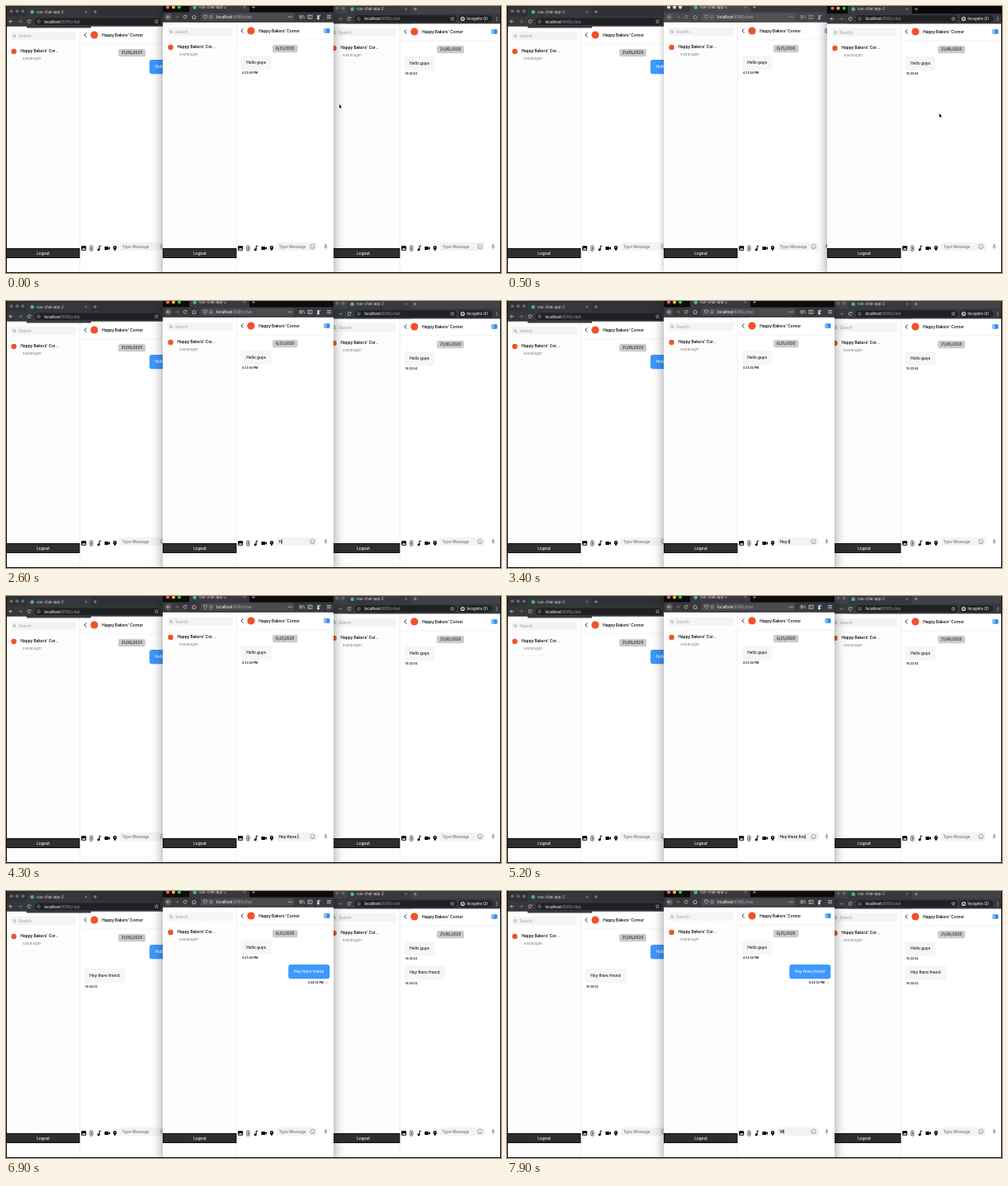
Recreate the animation shown at these times as an HTML page with a canvas. Size 600 by 323 pixels, loop 8000 ms.

```html
<!DOCTYPE html>
<html lang="en">
<head>
<meta charset="utf-8">
<title>Chat in three browsers</title>
<style>
html, body { margin: 0; width: 100%; height: 100%; overflow: hidden; background: #111; }
canvas { display: block; width: 600px; height: 323px; }
</style>
</head>
<body>
<canvas id="stage"></canvas>
<script>
const W = 600, H = 323, LOOP = 8000, STEP = 100;
const ROOM = "Happy Bakers' Corner", ROOM_CUT = "Happy Bakers' Cor...", MEMBER = "sourdough1";
const MARK = "#f0512c", BLUE = "#3d98ff", INK = "#111";
const MESSAGE = "Hey there friend";
const KEY_TIMES = [2500, 2800, 3000, 3200, 3300, 3500, 3600, 3700, 3900, 4100, 4600, 4800, 4900, 5100, 5300, 5500];
const SENT = 5900, OWN_SHOWN = 6300, RECEIVED = 6400, NEXT_KEY = 7800;
const FOCUS_RIGHT = [200, 1000];
const POINTER = [[0, 404, 121], [400, 524, 132], [700, 524, 132], [1100, 325, 206], [1300, 325, 206], [2000, 342, 288]];
const POINTER_HIDDEN = 2200;

// top is the lower edge of the toolbar, head the vertical centre of the chat header
const left = { x: 0, w: 215.6, top: 24.5, head: 35, tabY: 7, kind: "chrome" };
const middle = { x: 190, w: 207, top: 19.5, head: 30, tabY: 1.4, kind: "firefox" };
const right = { x: 388, w: 212, top: 21.3, head: 31, tabY: 3.6, kind: "incognito" };

const canvas = document.getElementById("stage");
const ctx = canvas.getContext("2d");
const dpr = window.devicePixelRatio || 1;
canvas.width = W * dpr;
canvas.height = H * dpr;

function rect(x, y, w, h, color, r = 0) {
  ctx.fillStyle = color;
  ctx.beginPath();
  ctx.roundRect(x, y, w, h, r);
  ctx.fill();
}

function dot(x, y, r, color) {
  ctx.fillStyle = color;
  ctx.beginPath();
  ctx.arc(x, y, r, 0, 7);
  ctx.fill();
}

function ring(x, y, r, color, width = 0.6, from = 0, to = Math.PI * 2) {
  ctx.strokeStyle = color;
  ctx.lineWidth = width;
  ctx.beginPath();
  ctx.arc(x, y, r, from, to);
  ctx.stroke();
}

function trace(points) {
  ctx.beginPath();
  points.forEach(([x, y], i) => i ? ctx.lineTo(x, y) : ctx.moveTo(x, y));
}

function line(color, width, ...points) {
  ctx.strokeStyle = color;
  ctx.lineWidth = width;
  trace(points);
  ctx.stroke();
}

function poly(color, ...points) {
  ctx.fillStyle = color;
  trace(points);
  ctx.fill();
}

function text(s, x, y, color = INK, size = 4.7, weight = 500, align = "left") {
  ctx.font = `${weight} ${size}px Inter, sans-serif`;
  ctx.textAlign = align;
  ctx.textBaseline = "middle";
  ctx.fillStyle = color;
  ctx.fillText(s, x, y + 0.5);
  return ctx.measureText(s).width;
}

function arrow(x, y, dir, color) {
  line(color, 0.7, [x - 2, y], [x + 2, y]);
  line(color, 0.7, [x + dir * 0.3, y - 1.8], [x + dir * 2.1, y], [x + dir * 0.3, y + 1.8]);
}

function reload(x, y, color) {
  ring(x, y, 1.9, color, 0.7, 0.3, 5.4);
  poly(color, [x + 0.5, y - 0.4], [x + 2.3, y - 2.2], [x + 2.3, y - 0.4]);
}

function star(x, y, r, color) {
  const points = Array.from({ length: 11 }, (_, i) => {
    const a = i * Math.PI / 5 - Math.PI / 2, d = i % 2 ? r * 0.45 : r;
    return [x + d * Math.cos(a), y + d * Math.sin(a)];
  });
  line(color, 0.5, ...points);
}

function address(x, y, color) {
  const host = text("localhost", x, y, "#f1f1f1", 4.5);
  text(":8080/chat", x + host, y, color, 4.5, 400);
}

function trafficLights(x, y, colors) {
  colors.forEach((c, i) => dot(x + i * 7, y, 2, c));
}

function tabs({ x, w, top, tabY }, tabX, tabW, stripColor, barColor) {
  rect(x, 0, w, top, stripColor);
  rect(tabX, Math.max(0, tabY - 5), tabW, top, barColor, [2, 2, 0, 0]);
  rect(x, top - 12, w, 12, barColor);
  rect(tabX + 4.5, tabY - 2, 4.5, 4.5, "#41b883", 2.2);
  text("vue-chat-app-2", tabX + 12, tabY, "#dcdcdc", 4.4, 400);
  const cx = tabX + tabW - 6, plus = tabX + tabW + 5;
  line("#b5b5b5", 0.5, [cx - 1.2, tabY - 1.2], [cx + 1.2, tabY + 1.2]);
  line("#b5b5b5", 0.5, [cx - 1.2, tabY + 1.2], [cx + 1.2, tabY - 1.2]);
  line("#c4c4c4", 0.6, [plus - 2, tabY], [plus + 2, tabY]);
  line("#c4c4c4", 0.6, [plus, tabY - 2], [plus, tabY + 2]);
}

function chromeBar(win, focused) {
  const { x, top, tabY, kind } = win;
  const y = top - 5.8, incognito = kind === "incognito";
  const strip = incognito ? (focused ? "#08090b" : "#414245") : "#303134";
  tabs(win, x + 25, 78, strip, incognito ? "#38393d" : "#37383b");
  trafficLights(x + 6.5, tabY - 0.8, focused ? ["#ff5f57", "#febc2e", "#28c840"] : Array(3).fill("#66676a"));
  arrow(x + 6, y, -1, "#dedede");
  arrow(x + 17, y, 1, "#85868a");
  reload(x + 28, y, "#d5d5d5");
  rect(x + 34.5, y - 4.3, incognito ? 124 : 153, 8.6, "#202124", 4.3);
  ring(x + 39.5, y, 1.8, "#bdbdbd", 0.5);
  line("#bdbdbd", 0.5, [x + 39.5, y - 0.3], [x + 39.5, y + 1]);
  address(x + 46.4, y, "#9b9da1");
  star(x + (incognito ? 153 : 182.5), y, 2.4, "#d6d6d6");
  if (!incognito) return;
  rect(x + 160.5, y - 4.3, 41, 8.6, "#222327", 4.3);
  dot(x + 165.5, y, 2.6, "#e3e3e3");
  rect(x + 163.7, y - 0.4, 3.6, 0.6, "#222327");
  rect(x + 164.6, y - 1.5, 1.8, 1, "#222327");
  dot(x + 164.7, y + 1, 0.6, "#222327");
  dot(x + 166.3, y + 1, 0.6, "#222327");
  text("Incognito (2)", x + 170.5, y, "#f0f0f0", 4.2);
  for (let i = -1; i < 2; i++) dot(x + 207, y + i * 1.8, 0.55, "#e2e2e2");
}

function firefoxBar(win, focused) {
  const { x, top, tabY } = win;
  const y = top - 6.3, icon = focused ? "#d5d5d7" : "#a2a2a6";
  const bar = focused ? "#38383d" : "#47474b";
  tabs(win, x + 32, 73, focused ? "#0c0c0d" : "#38383c", bar);
  trafficLights(x + 6, tabY, focused ? ["#ff5f57", "#febc2e", "#28c840"] : Array(3).fill("#dddddd"));
  dot(x + 6.8, y, 4.2, focused ? "#55555a" : "#58585d");
  arrow(x + 6.8, y, -1, icon);
  arrow(x + 17, y, 1, "#7c7c80");
  reload(x + 27, y, icon);
  line(icon, 0.7, [x + 35.4, y], [x + 38, y - 2.2], [x + 40.6, y]);
  line(icon, 0.7, [x + 36.3, y - 0.5], [x + 36.3, y + 2.2], [x + 39.7, y + 2.2], [x + 39.7, y - 0.5]);
  rect(x + 46, y - 4.6, 113, 9.2, focused ? "#4a4a4f" : "#515156", 1);
  line(icon, 0.6, [x + 49.5, y - 2], [x + 53.5, y - 2], [x + 53.2, y + 0.8], [x + 51.5, y + 2.4], [x + 49.8, y + 0.8], [x + 49.5, y - 2]);
  ring(x + 58.5, y, 1.9, icon, 0.5);
  line(icon, 0.5, [x + 58.5, y - 0.4], [x + 58.5, y + 1]);
  address(x + 65, y, "#b1b1b3");
  for (let i = 0; i < 3; i++) dot(x + 152.3 + i * 2, y, 0.6, icon);
  for (let i = 0; i < 3; i++) line(icon, 0.7, [x + 166 + i * 1.5, y - 2.2], [x + 166 + i * 1.5, y + 2.2]);
  line(icon, 0.7, [x + 170.4, y - 2], [x + 172, y + 2.2]);
  ctx.strokeRect(x + 176, y - 2, 5, 4);
  line(icon, 0.6, [x + 178, y - 2], [x + 178, y + 2]);
  dot(x + 188.5, y - 0.8, 1.3, icon);
  dot(x + 188.5, y + 1.7, 1.6, icon);
  dot(x + 190.5, y - 1.8, 1, "#37adff");
  for (let i = -1; i < 2; i++) line(icon, 0.7, [x + 199, y + i * 1.7], [x + 204, y + i * 1.7]);
}

function attachIcons(x, y) {
  rect(x + 91.2, y - 2.8, 6, 5.6, "#000", 0.8);
  poly("#fff", [x + 92, y + 1.8], [x + 93.5, y - 0.3], [x + 94.5, y + 0.7], [x + 95.3, y - 0.6], [x + 96.5, y + 1.8]);
  ctx.strokeStyle = "#222";
  ctx.lineWidth = 0.75;
  ctx.beginPath();
  ctx.roundRect(x + 101.8, y - 3.2, 3.2, 6.6, 1.6);
  ctx.moveTo(x + 103.5, y - 1.5);
  ctx.lineTo(x + 103.5, y + 1.8);
  ctx.stroke();
  dot(x + 112.2, y + 1.8, 1.5, "#000");
  line("#000", 1, [x + 113.2, y + 1.8], [x + 113.2, y - 2.6], [x + 115.2, y - 2.6]);
  rect(x + 119.5, y - 2, 4.6, 4, "#000", 0.6);
  poly("#000", [x + 123.8, y], [x + 126, y - 1.9], [x + 126, y + 1.9]);
  dot(x + 132, y - 0.9, 2.2, "#000");
  poly("#000", [x + 130, y - 0.1], [x + 134, y - 0.1], [x + 132, y + 3.4]);
  dot(x + 132, y - 1, 0.75, "#fff");
}

function bubble(s, x, y, w, own) {
  rect(x, y, w, 17.3, own ? BLUE : "#f6f6f6", 3);
  text(s, x + 6.6, y + 8.5, own ? "#fff" : INK);
}

function composer(win, draft, caret) {
  const { x, w } = win;
  attachIcons(x, 293);
  rect(x + 137.5, 286, w - 157, 10, "#f3f3f4", 2);
  if (draft) {
    const end = x + 140.5 + text(draft, x + 140.5, 291, "#000");
    if (caret) rect(end + 0.2, 288.3, 0.6, 5.4, "#000");
  } else {
    text("Type Message", x + 140.8, 291, "#757575");
  }
  const ex = x + w - 25.5, mx = x + w - 9.5;
  ring(ex, 291, 2.8, "#777", 0.55);
  ring(ex, 291.3, 1.4, "#777", 0.5, 0.2, 2.9);
  dot(ex - 1, 290.1, 0.4, "#777");
  dot(ex + 1, 290.1, 0.4, "#777");
  rect(mx - 0.9, 288, 1.8, 4, "#888", 0.9);
  ring(mx, 291, 1.9, "#888", 0.5, 0, Math.PI);
  line("#888", 0.5, [mx, 292.9], [mx, 294.3]);
}

function sidebar({ x, top, head }) {
  rect(x, top, 89.3, H, "#fdfdfd");
  rect(x + 5.3, head - 4, 79.5, 10, "#f4f4f5", 2);
  ring(x + 10, head + 0.9, 1.4, "#777", 0.5);
  line("#777", 0.5, [x + 11, head + 1.9], [x + 12.1, head + 3]);
  text("Search", x + 15.3, head + 1.2, "#999", 4.7, 400);
  dot(x + 9.5, head + 20, 3.2, MARK);
  text(ROOM_CUT, x + 17.6, head + 19.2, INK, 4.7, 600);
  text(MEMBER, x + 20.3, head + 28.2, "#777", 4.1, 400);
  rect(x + 18, head + 36.7, 62, 0.5, "#eee");
  rect(x + 89, top, 0.5, H, "#e2e2e2");
  rect(x, 293, 89.5, 12, "#0c0c0d");
  rect(x + 1, 294, 87.5, 10, "#2e2e31");
  text("Logout", x + 45, 298.7, "#fff", 4.7, 500, "center");
}

function chat(win, t) {
  const { x, w, head } = win;
  const us = win === middle;
  line(INK, 0.8, [x + 97.5, head - 2.6], [x + 95, head], [x + 97.5, head + 2.6]);
  dot(x + 107, head, 4.6, MARK);
  text(ROOM, x + 116.2, head, INK, 4.7, 600);
  rect(x + w - 11.5, head - 2.8, 7, 5.6, "#2b8cf0", 0.8);
  rect(x + w - 11, head - 2.3, 2.6, 4.6, "#86bdf6");
  rect(x + 89.5, head + 10.8, w - 89.5, 0.5, "#e8e8e8");

  const mid = x + (89.5 + w) / 2, pill = us ? 30.5 : 33;
  rect(mid - pill / 2, head + 17, pill, 9.2, "#cacbcd", 2.2);
  text(us ? "6/21/2020" : "21/06/2020", mid, head + 21.4, "#222", 4.6, 500, "center");

  const inX = x + 94.7, outX = x + w - 4.7;
  if (win === left) {
    bubble("Hello guys", outX - 37, head + 30, 37, true);
  } else {
    bubble("Hello guys", inX, head + 30, 37, false);
    text(us ? "4:33:54 PM" : "16:33:54", inX + 1.3, head + 50.8, INK, 3.4, 600);
  }
  if (us && t >= OWN_SHOWN) {
    bubble(MESSAGE, outX - 50, head + 59, 50, true);
    text("4:34:02 PM", outX - 7.3, head + 80.8, INK, 3.4, 600, "right");
    line("#888", 0.5, [outX - 5, head + 81], [outX - 4, head + 82], [outX - 2, head + 79.6]);
  } else if (!us && t >= RECEIVED) {
    bubble(MESSAGE, inX, head + 59, 50, false);
    text("16:34:02", inX + 1.3, head + 80.2, INK, 3.4, 600);
  }
}

function draftAt(t) {
  if (t >= NEXT_KEY) return "W";
  return t < SENT ? MESSAGE.slice(0, KEY_TIMES.filter(k => k <= t).length) : "";
}

function caretAt(t) {
  const last = Math.max(0, ...[...KEY_TIMES, NEXT_KEY].filter(k => k <= t));
  return (t - last) % 1000 < 500;
}

function drawWindow(win, focused, t) {
  const { x, w } = win;
  ctx.save();
  ctx.shadowColor = `rgba(0,0,0,${focused ? 0.42 : 0.3})`;
  ctx.shadowBlur = (focused ? 13 : 7) * dpr;
  ctx.shadowOffsetY = (focused ? 6 : 3) * dpr;
  rect(x, 0, w, H, "#fff");
  ctx.restore();
  ctx.save();
  ctx.beginPath();
  ctx.rect(x, 0, w, H);
  ctx.clip();
  sidebar(win);
  chat(win, t);
  composer(win, win === middle ? draftAt(t) : "", caretAt(t));
  (win === middle ? firefoxBar : chromeBar)(win, focused);
  ctx.restore();
}

function pointer(t) {
  if (t >= POINTER_HIDDEN) return;
  const next = POINTER.findIndex(p => p[0] > t);
  let [, x, y] = POINTER[POINTER.length - 1];
  if (next > 0) {
    const [t0, x0, y0] = POINTER[next - 1], [t1, x1, y1] = POINTER[next];
    const k = (t - t0) / (t1 - t0), e = k * k * (3 - 2 * k);
    x = x0 + (x1 - x0) * e;
    y = y0 + (y1 - y0) * e;
  }
  const shape = [[0, -2], [0, 2.4], [1, 1.6], [1.7, 3], [2.4, 2.7], [1.8, 1.4], [3, 1.3], [0, -2]]
    .map(([dx, dy]) => [x + dx, y + dy]);
  line("#fff", 0.9, ...shape);
  poly("#000", ...shape);
}

// The dark desktop shows as a thin edge around the windows.
function desktopEdge() {
  rect(0, 0, 1, H, "#0c0c0c");
  rect(W - 1, 0, 1, H, "#0c0c0c");
  rect(0, H - 1, W, 1, "#0c0c0c");
}

function draw(t) {
  ctx.setTransform(dpr, 0, 0, dpr, 0, 0);
  const rightFront = t >= FOCUS_RIGHT[0] && t < FOCUS_RIGHT[1];
  drawWindow(left, false, t);
  const order = rightFront ? [middle, right] : [right, middle];
  order.forEach((win, i) => drawWindow(win, i === 1, t));
  desktopEdge();
  pointer(t);
}

function tick(now) {
  draw(Math.floor((now % LOOP) / STEP) * STEP);
  requestAnimationFrame(tick);
}
requestAnimationFrame(tick);
</script>
</body>
</html>
```
